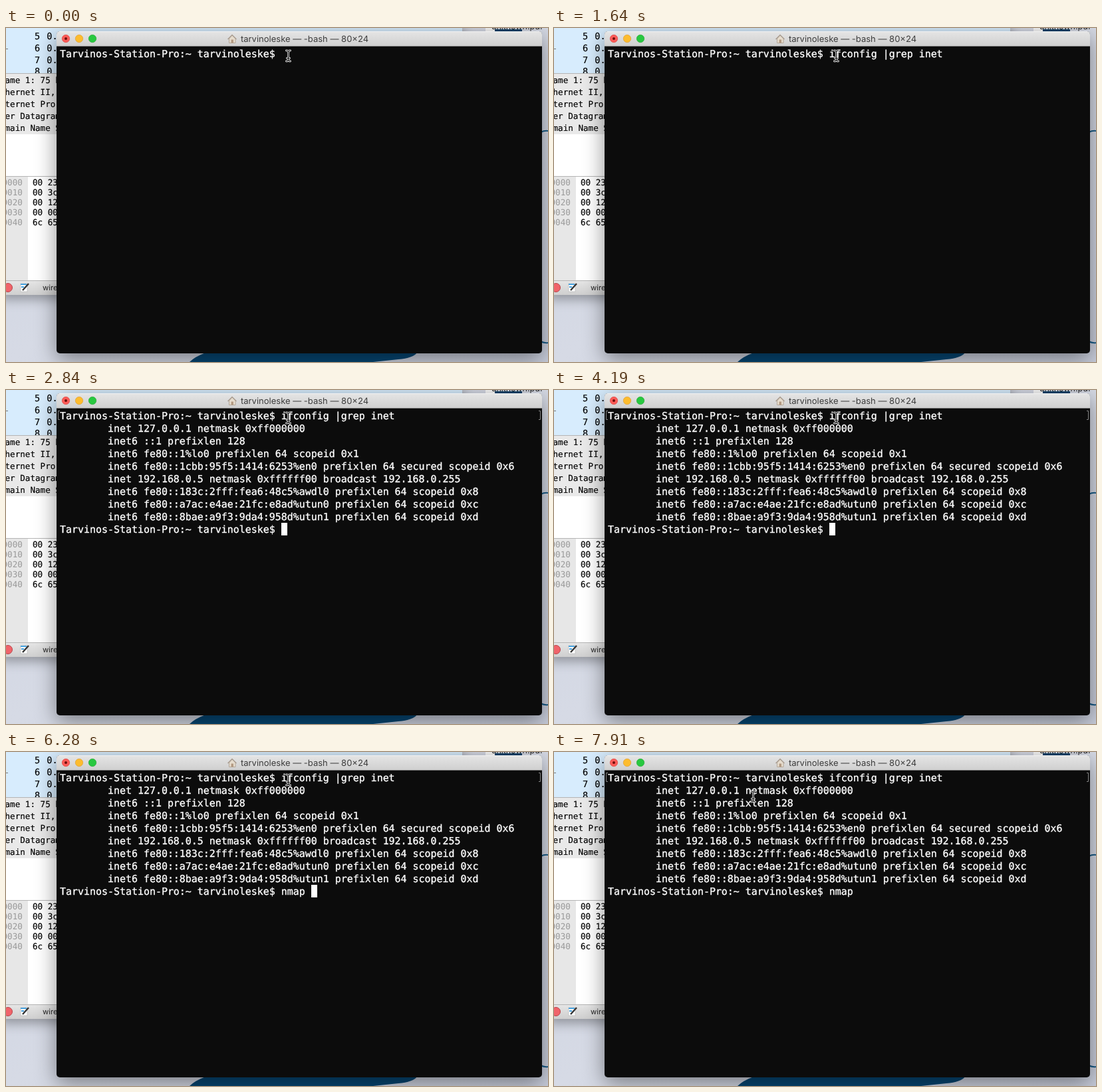
An HTML page that plays this animation: 815 px wide and 503 px high, repeating every 8000 ms.

```html
<!DOCTYPE html>
<html lang="en">
<head>
<meta charset="utf-8">
<title>Terminal session</title>
<style>
  html, body { margin: 0; width: 100%; height: 100%; overflow: hidden; background: #d1d6e2; }
  svg { display: block; }
  text { white-space: pre; text-rendering: geometricPrecision; }
  .mono { font-family: "DejaVu Sans Mono", monospace; }
  .ui { font-family: Inter, sans-serif; }
  #screen { font-size: 14.95px; fill: #fff; stroke: #fff; stroke-width: .35px; }
  #capture { font-size: 12.6px; fill: #000; stroke: #000; stroke-width: .15px; }
  #capture .offset { fill: #999; stroke: none; }
  #capture .packet { font-size: 13.6px; word-spacing: 2px; }
  #window { filter: drop-shadow(0 8px 16px rgba(0, 0, 0, .44)); }
  #analyser { filter: drop-shadow(0 6px 9px rgba(0, 0, 0, .34)); }
</style>
</head>
<body>
<svg width="815" height="503" viewBox="0 0 815 503">
  <defs>
    <linearGradient id="wall" x2="1" y2="1">
      <stop stop-color="#ccd2e0"/><stop offset=".5" stop-color="#d6dae5"/><stop offset="1" stop-color="#c8cddb"/>
    </linearGradient>
    <linearGradient id="bar" x2="0" y2="1">
      <stop stop-color="#e5e5e5"/><stop offset="1" stop-color="#cfcfcf"/>
    </linearGradient>
    <clipPath id="listClip"><rect width="686" height="68"/></clipPath>
    <path id="beamShape" d="M-3-8Q0-8 0-5.5V5.5Q0 8-3 8M3-8Q0-8 0-5.5M0 5.5Q0 8 3 8M-2 3.5H2"/>
  </defs>

  <!-- Desktop -->
  <rect width="815" height="503" fill="url(#wall)"/>
  <path d="M276 503Q284 495 300 489H618Q612 497 590 499L552 503Z" fill="#064672"/>
  <path d="M804 157Q810 154 815 155M804 472Q810 475 815 474" fill="none" stroke="#155a86" stroke-width="2"/>
  <rect x="721" width="14" height="5" fill="#fafafa"/>
  <path d="M735 2H776V6H735Z" fill="#0b426b"/>
  <text class="ui" x="730" y="2" font-size="12.5" fill="#222">unknown.pdf</text>

  <!-- Packet analyser -->
  <g id="analyser">
    <rect x="-10" y="-10" width="696" height="412" fill="#fff"/>
    <rect width="686" height="68" fill="#d7ecfd"/>
    <rect y="69" width="686" height="91" fill="#e9e9e9"/>
    <rect y="224" width="33" height="156" fill="#e7e7e7"/>
    <path d="M0 68.5H686M0 223.5H686M0 380.5H686" stroke="#b4b4b4"/>
    <rect y="381" width="686" height="21" fill="url(#bar)"/>
  </g>
  <g id="capture" class="mono"></g>
  <path d="M0 31.5H3" stroke="#777"/>
  <circle cx="3" cy="391" r="6.5" fill="#f0646a" stroke="#b9474d"/>
  <rect x="22" y="385" width="10" height="12" fill="#fdfdfd" stroke="#bbb" stroke-width=".7"/>
  <path d="M22 386H31M23 390H27" stroke="#4aa3df" stroke-width="2"/>
  <path d="M25 395L34 385" stroke="#333" stroke-width="2.4"/>
  <text class="ui" x="55" y="395" font-size="11.3" fill="#222">wireshark</text>

  <!-- Terminal -->
  <g id="window">
    <rect x="76" y="5" width="730" height="485" rx="5" fill="#0c0c0c"/>
    <path d="M76 27.5V10Q76 5 81 5H801Q806 5 806 10V27.5Z" fill="url(#bar)"/>
  </g>
  <path d="M80 5.5H802" stroke="#f1f1f1"/>
  <circle cx="90" cy="16" r="5.7" fill="#fc5b57" stroke="#df4744" stroke-width=".7"/>
  <circle cx="90" cy="16" r="2" fill="#6b0d0b"/>
  <circle cx="110" cy="16" r="5.7" fill="#fdbc2e" stroke="#dea034" stroke-width=".7"/>
  <circle cx="130" cy="16" r="5.7" fill="#28c840" stroke="#27aa35" stroke-width=".7"/>
  <path d="M335.5 16V22.5H345V16L340 11Z" fill="#e6dccd" stroke="#b4a89a"/>
  <path d="M333.5 17L340 10.5L346.5 17" fill="none" stroke="#a99d91" stroke-width="1.4"/>
  <rect x="338.5" y="17.5" width="3.5" height="5" fill="#b39a82"/>
  <text id="title" class="ui" x="449" y="21" font-size="13" text-anchor="middle" fill="#3c3c3c"></text>
  <g id="screen" class="mono"></g>
  <path id="brackets" d="M81 31.5H78.5V44.5H81M801 31.5H803.5V44.5H801" fill="none" stroke="#858585"/>
  <rect id="cursor" width="9" height="19" fill="#fff"/>
  <g id="beam" fill="none" stroke-linecap="round">
    <use href="#beamShape" stroke="#e8e8e8" stroke-width="2.8"/>
    <use href="#beamShape" stroke="#111" stroke-width="1.1"/>
  </g>
</svg>
<script>
const LOOP = 8000, OUTPUT_AT = 2840;
const CELL = 9, ROW = 19, LEFT = 81, TOP = 29, BASELINE = 15;
const USER = 'tarvinoleske';
const PROMPT = `Tarvinos-Station-Pro:~ ${USER}$ `;
const COMMAND = 'ifconfig |grep inet';
const OUTPUT = [
  'inet 127.0.0.1 netmask 0xff000000',
  'inet6 ::1 prefixlen 128',
  'inet6 fe80::1%lo0 prefixlen 64 scopeid 0x1',
  'inet6 fe80::1cbb:95f5:1414:6253%en0 prefixlen 64 secured scopeid 0x6',
  'inet 192.168.0.5 netmask 0xffffff00 broadcast 192.168.0.255',
  'inet6 fe80::183c:2fff:fea6:48c5%awdl0 prefixlen 64 scopeid 0x8',
  'inet6 fe80::a7ac:e4ae:21fc:e8ad%utun0 prefixlen 64 scopeid 0xc',
  'inet6 fe80::8bae:a9f3:9da4:958d%utun1 prefixlen 64 scopeid 0xd',
];

// [start time, text after the prompt, block cursor visible]
const TYPING = [
  [0, '', false], [140, 'clear', true],
  [740, COMMAND, true], [1640, COMMAND, false], [2240, COMMAND, true], [2690, COMMAND, false],
  [OUTPUT_AT, '', true], [3740, '', false], [4190, '', true], [4640, '', false],
  [5240, 'n', true], [5380, 'nm', true], [5530, 'nma', true], [5680, 'nmap', true],
  [6280, 'nmap ', true], [7610, 'nmap ', false],
];
// [start time, x, y]; no position means the pointer is hidden
const POINTER = [
  [0, 424.5, 42], [6720], [7020, 264.5, 67], [7320, 256.5, 93],
  [7470, 253.5, 102], [7760, 284.5, 67], [7910, 299.5, 67],
];

const byId = id => document.getElementById(id);
const [screen, capture, cursor, beam, brackets] =
  ['screen', 'capture', 'cursor', 'beam', 'brackets'].map(byId);

function addText(parent, x, y, content, attributes = {}) {
  const node = document.createElementNS('http://www.w3.org/2000/svg', 'text');
  for (const [name, value] of Object.entries({ x, y, ...attributes })) node.setAttribute(name, value);
  node.textContent = content;
  parent.append(node);
  return node;
}

byId('title').textContent = `${USER} — -bash — 80×24`;

[5, 6, 7, 8].forEach((number, i) =>
  addText(capture, 43, 17 + 17.8 * i, `${number} 0.`, { class: 'packet', 'clip-path': 'url(#listClip)' }));
['ame 1: 75 b', 'hernet II,', 'ternet Pro', 'er Datagram', 'main Name S'].forEach((line, i) =>
  addText(capture, -1.5, 83 + 18 * i, line));
['00 23', '00 3c', '00 12', '00 00', '6c 65'].forEach((bytes, i) => {
  const y = 237 + 15 * i;
  addText(capture, -5.5, y, `00${i}0`, { class: 'offset' });
  addText(capture, 40, y, bytes);
});

const lines = Array.from({ length: OUTPUT.length + 2 }, (_, i) =>
  addText(screen, LEFT, TOP + BASELINE + ROW * i, ''));

const stateAt = (steps, time) => steps.findLast(([start]) => start <= time);
const show = (node, visible) => node.setAttribute('visibility', visible ? 'visible' : 'hidden');

function draw(time) {
  const [, typed, cursorOn] = stateAt(TYPING, time);
  const done = time >= OUTPUT_AT;
  const content = done
    ? [PROMPT + COMMAND, ...OUTPUT.map(line => ' '.repeat(8) + line), PROMPT + typed]
    : [PROMPT + typed];
  lines.forEach((node, i) => {
    const line = content[i] ?? '';
    if (node.textContent !== line) node.textContent = line;
  });

  const row = content.length - 1;
  cursor.setAttribute('x', LEFT + CELL * content[row].length);
  cursor.setAttribute('y', TOP + ROW * row);
  show(cursor, cursorOn);
  show(brackets, done);

  const [, x, y] = stateAt(POINTER, time);
  show(beam, x !== undefined);
  if (x !== undefined) beam.setAttribute('transform', `translate(${x} ${y})`);
}

const origin = performance.now();
function tick() {
  draw((performance.now() - origin) % LOOP);
  requestAnimationFrame(tick);
}
tick();
</script>
</body>
</html>
```
